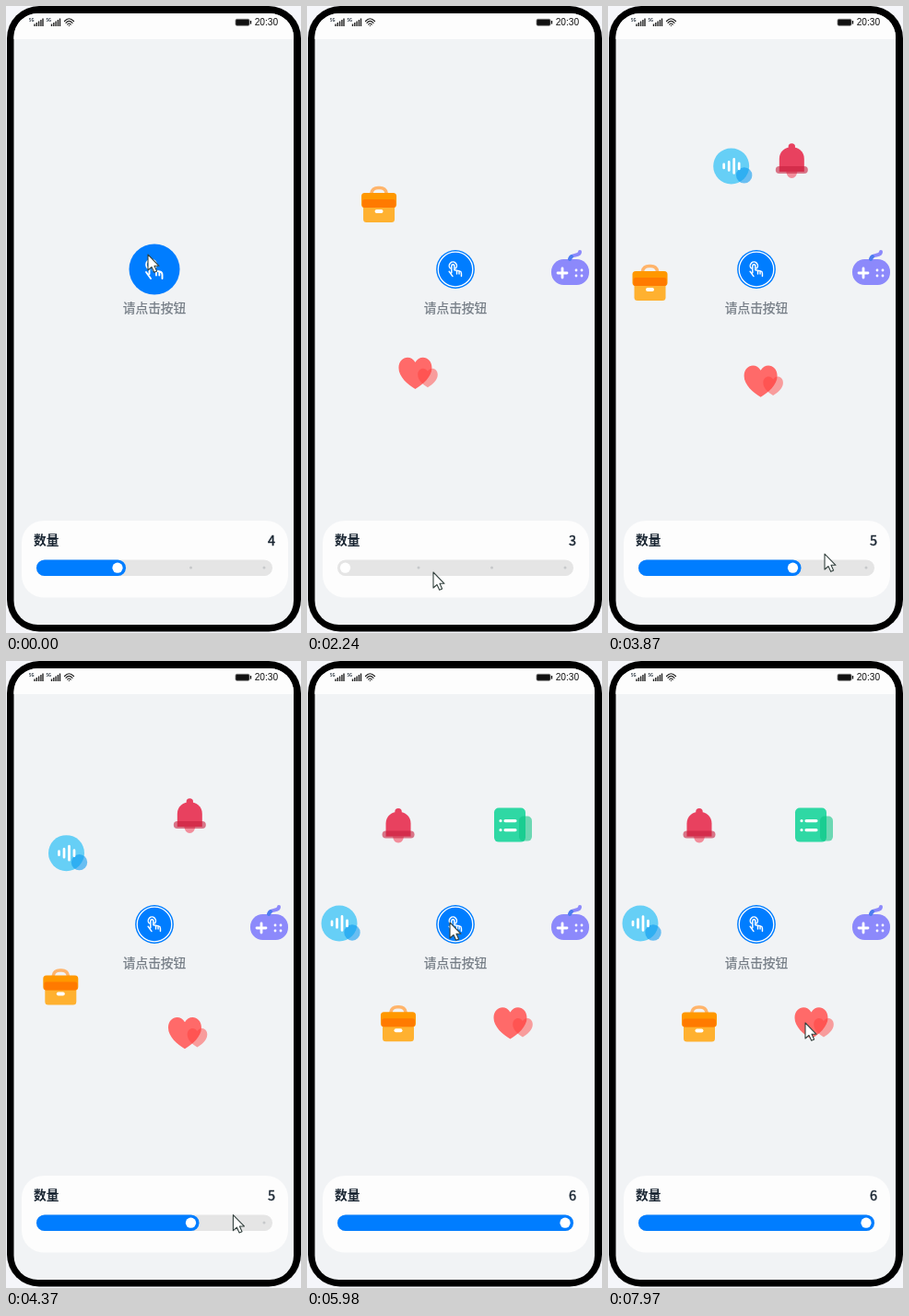
Animation, 320 px wide and 681 px high, one loop 8 s. Source, as an HTML page:

```html
<!DOCTYPE html>
<html lang="zh">
<head>
<meta charset="utf-8">
<style>
html, body { margin: 0; width: 100%; height: 100%; overflow: hidden; background: #f5f6fa }
svg { display: block }
text { font-family: "Noto Sans CJK SC", "Noto Sans CJK", sans-serif; fill: #182431 }
.bar text { font-family: "Liberation Sans", sans-serif; fill: #111 }
.line { fill: none; stroke-linecap: round; stroke-linejoin: round }
</style>
</head>
<body>
<svg width="320" height="681" viewBox="0 0 320 681">
  <defs>
    <path id="love" d="M0 17C-8 12-18 4-18-6C-18-18-5-21 0-12C5-21 18-18 18-6C18 4 8 12 0 17Z"/>
    <g id="signal">
      <text x="0" y="17" font-size="4.2" font-weight="bold">5G</text>
      <path d="M6 22v-2.5M8.3 22v-4M10.6 22v-5.5M12.9 22v-7M15 22v-8.5" stroke="#222" stroke-width="1.4"/>
    </g>
  </defs>

  <rect x="1" width="319" height="679.500" rx="35"/>
  <rect x="8.500" y="8" width="303.500" height="664" rx="26" fill="#f1f3f5"/>
  <path d="M8.500 36V34A26 26 0 0 1 34.500 8H286A26 26 0 0 1 312 34V36Z" fill="#fdfdfd"/>

  <g class="bar">
    <use href="#signal" x="25"/>
    <use href="#signal" x="43.5"/>
    <path class="line" d="M63.5 16.5Q68.3 11 73.5 16.5M65 18.3Q68.3 14.5 72 18.3M66.7 20Q68.3 18 70.2 20M68.4 21.4v.1" stroke="#222" stroke-width="1.2"/>
    <rect x="249" y="14.300" width="15" height="7" rx="1.500" fill="#111" stroke="#777" stroke-width=".8"/>
    <path d="M265.500 16v3.500" stroke="#111" stroke-width="1.300"/>
    <text x="269.700" y="21.300" font-size="10.200">20:30</text>
  </g>

  <g id="ring">
    <g>
      <rect x="-20" y="-11" width="41" height="28" rx="13.500" fill="#8c89fb"/>
      <path class="line" d="M0-10C0-18 11-13 11-19" stroke="#8c89fb" stroke-width="4"/>
      <path class="line" d="M0-11Q.5-13 2-14" stroke="#4d7cf0" stroke-width="4"/>
      <path class="line" d="M-13 4h10M-8-1v10" stroke="#fff" stroke-width="2.800"/>
      <path class="line" d="M7 1h.01M13 1h.01M7 7h.01M13 7h.01" stroke="#fff" stroke-width="2.800"/>
    </g>
    <g>
      <use href="#love" x="-2.500" fill="#ff6a69"/>
      <use href="#love" transform="translate(11 5) scale(.6)" fill="#ff3d3b" opacity=".48"/>
    </g>
    <g>
      <path class="line" d="M-8-11V-12Q-7-17.500-1-17.500H1Q7-17.500 8-12V-11" stroke="#ffb46b" stroke-width="3.500"/>
      <rect x="-17" y="-5" width="34" height="25" rx="3.500" fill="#ffb130"/>
      <rect x="-19" y="-12" width="38" height="16" rx="3.500" fill="#ff9800"/>
      <rect x="-18" y="-5" width="36" height="9" rx="2.500" fill="#ff7a00"/>
      <rect x="-4.500" y="6" width="9" height="4" rx="2" fill="#fff"/>
    </g>
    <g>
      <circle cx="-2" cy="-1" r="19.500" fill="#66cff6"/>
      <circle cx="12" cy="9" r="8.700" fill="#0798f0" opacity=".58"/>
      <path class="line" d="M-10-3v4M-4.500-5.500v9M1-8.500v15M6.500-4v6" stroke="#fff" stroke-width="2.700"/>
    </g>
    <g>
      <path d="M-6 12H6Q5 19 0 19Q-5 19-6 12Z" fill="#f28d9b"/>
      <circle cy="-15" r="3.700" fill="#e8415f"/>
      <path d="M-13.500 12V-2C-13.500-19 13.500-19 13.500-2V12Z" fill="#e8415f"/>
      <rect x="-17.500" y="6" width="35" height="8" rx="4" fill="#c8203f" opacity=".6"/>
    </g>
    <g>
      <rect x="-20" y="-19" width="34" height="37" rx="5" fill="#2fd8a4"/>
      <rect x="7" y="-10" width="14" height="27" rx="5" fill="#0cc483" opacity=".58"/>
      <path class="line" d="M-13-5h.01M-8-5H3M-13 5h.01M-8 5H3" stroke="#fff" stroke-width="3.200"/>
    </g>
  </g>

  <g id="button">
    <circle r="27.500" fill="#007dff"/>
    <circle id="rim" r="24.700" fill="none" stroke="#fff" stroke-width="1.700"/>
    <path class="line" d="M-7.500-1.500A5.400 5.400 0 1 1 .5-1.500M-9 3L-4 10M-5.500 5V-5a2 2 0 0 1 4 0V1L6 2.500Q8.500 3 8.500 6V10M2 2.500v4M5.300 3v3.500" stroke="#fff" stroke-width="1.900"/>
  </g>
  <text x="161" y="333" font-size="13.700" text-anchor="middle" style="fill:#737b84;stroke:#737b84;stroke-width:.25">请点击按钮</text>

  <rect x="17" y="559" width="289" height="83.500" rx="24" fill="#fdfdfd"/>
  <text x="30" y="585" font-size="13.700" font-weight="bold">数量</text>
  <text id="count" x="292" y="585.500" font-size="14.500" text-anchor="end" stroke="#182431" stroke-width=".4"></text>
  <rect x="33" y="601.500" width="256" height="17.500" rx="8.750" fill="#e5e5e5"/>
  <path class="line" d="M121 610h.01M200.500 610h.01M280 610h.01" stroke="#c6c8ca" stroke-width="3"/>
  <rect id="fill" x="33" y="601.500" height="17.500" rx="8.750" fill="#007dff"/>
  <circle id="knob" cy="610.200" r="5.600" fill="#fff"/>

  <path id="cursor" d="M0 0V17L4 13.500L6.700 19.300L9.600 18L7 12.300H12Z" fill="#fff" stroke="#34423f" stroke-width="1.100" stroke-linejoin="round"/>
</svg>
<script>
const LOOP = 8000, RADIUS = 124, CX = 161, CY = 286;
const MOVE = 1000, OPEN = 625, LAG = 110;
const $ = id => document.getElementById(id);
const icons = [...$("ring").children];

// [time, number of icons]
const counts = [[-9000, 4], [1745, 3], [2870, 4], [3580, 5], [4900, 6]];
// [time, x, y]
const path = [
  [0, 154, 270], [520, 154, 270], [880, 101, 597], [1000, 93, 616], [1380, 116, 624],
  [1630, 119, 614], [1745, 62, 613], [1990, 100, 616], [2130, 137, 615], [2490, 137, 615],
  [2870, 124, 609], [3370, 190, 609], [3580, 203, 609], [3870, 235, 595], [4240, 240, 603],
  [4730, 264, 598], [4870, 278, 606], [4980, 255, 510], [5120, 175, 328], [5230, 157, 288],
  [5480, 155, 284], [7300, 155, 284], [7720, 178, 393], [7970, 214, 393], [8000, 214, 393]
];

const mix = (a, b, k) => a + (b - a) * k;
const bez = (u, a, b) => 3 * u * (1 - u) * ((1 - u) * a + u * b) + u ** 3;

// cubic-bezier(.25, .1, .25, 1)
function ease(x) {
  if (x <= 0) return 0;
  if (x >= 1) return 1;
  let lo = 0, hi = 1;
  for (let i = 0; i < 24; i++) {
    const mid = (lo + hi) / 2;
    if (bez(mid, .25, .25) < x) lo = mid; else hi = mid;
  }
  return bez(lo, .1, 1);
}

function spread(t) {
  if (t < 6135) return ease((t - 440) / OPEN);
  if (t < 7030) return 1 - ease((t - 6135) / OPEN);
  return ease((t - 7030) / OPEN);
}

// Each change starts from wherever the one before had brought the icon.
function place(i, k, t) {
  const [since, n] = counts[k], a = i * 2 * Math.PI / n;
  const goal = [RADIUS * Math.cos(a), RADIUS * Math.sin(a)];
  if (!k || i >= counts[k - 1][1]) return goal;
  const begin = since + LAG, p = ease((t - begin) / MOVE);
  return place(i, k - 1, Math.min(t, begin)).map((from, j) => mix(from, goal[j], p));
}

function drawRing(t, k, open) {
  $("ring").setAttribute("transform", `translate(${CX} ${CY}) rotate(${360 * (open - 1)})`);
  icons.forEach((icon, i) => {
    const [x, y] = place(i, k, t);
    icon.setAttribute("transform", `translate(${x * open} ${y * open})`);
    icon.style.display = i < counts[k][1] && open > 0 ? "" : "none";
  });
}

function drawSlider(n) {
  const x = 41.5 + 79.5 * (n - 3);
  $("count").textContent = n;
  $("knob").setAttribute("cx", x);
  $("fill").setAttribute("width", n > 3 ? x + 9 - 33 : 0);
}

function drawCursor(t) {
  const i = path.findIndex(p => p[0] > t), [t0, x0, y0] = path[i - 1], [t1, x1, y1] = path[i];
  const k = (t - t0) / (t1 - t0);
  $("cursor").setAttribute("transform", `translate(${mix(x0, x1, k)} ${mix(y0, y1, k)})`);
}

function draw(now) {
  const t = Math.max(0, now) % LOOP, open = spread(t);
  const k = counts.findLastIndex(c => c[0] <= t);
  drawRing(t, k, open);
  drawSlider(counts[k][1]);
  drawCursor(t);
  $("button").setAttribute("transform", `translate(${CX} ${CY}) scale(${1 - .24 * open})`);
  const plain = t < 380 || (t > 6760 && t < 6950);
  $("rim").style.display = plain ? "none" : "";
}

const start = performance.now();
function tick() {
  draw(performance.now() - start);
  requestAnimationFrame(tick);
}
tick();
</script>
</body>
</html>
```
